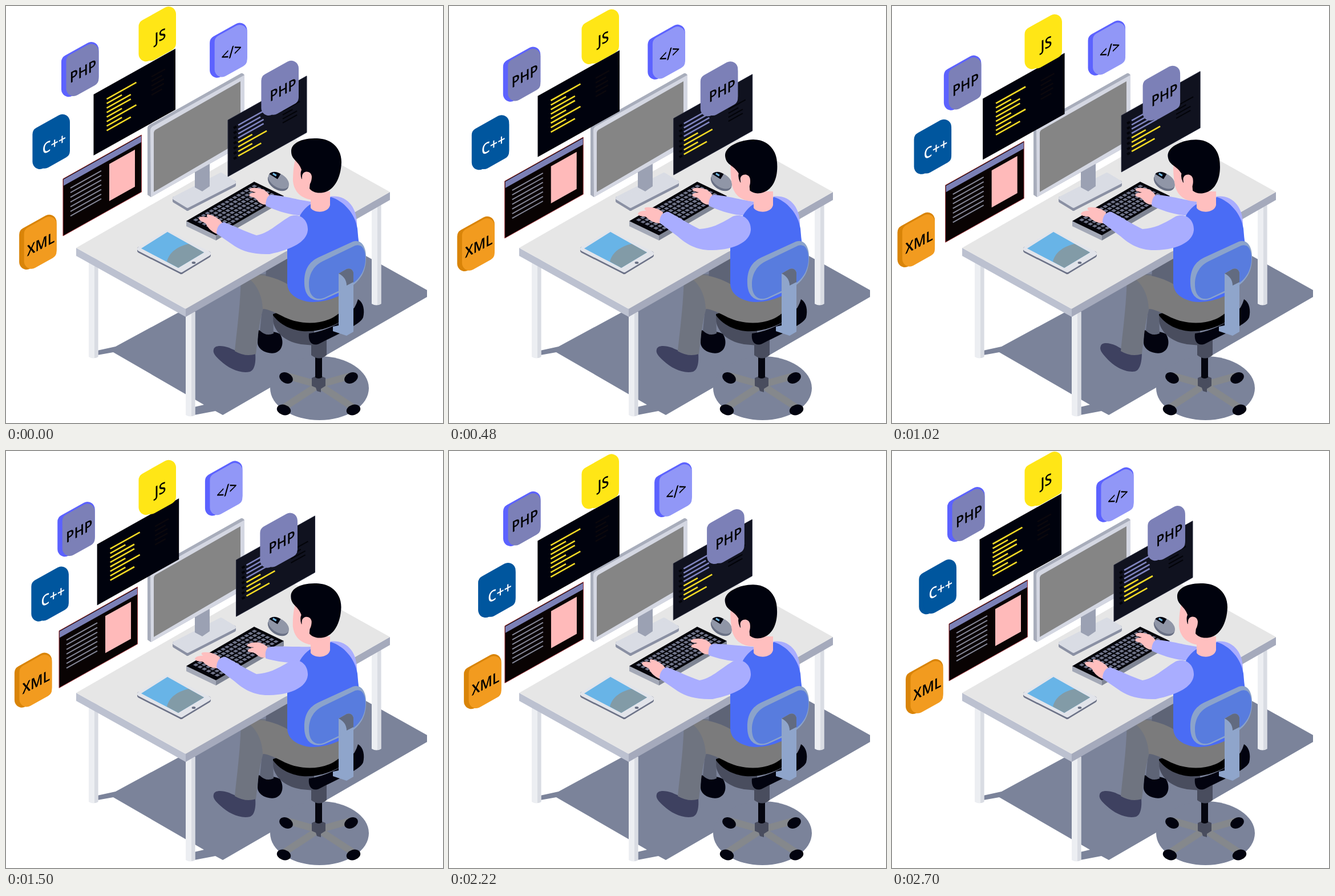
An HTML page that plays this animation: 766 by 731 pixels, repeating every 2.76 s.

```html
<!DOCTYPE html>
<html lang="en">
<head>
<meta charset="utf-8">
<title>Developer at a desk</title>
<style>
html, body { margin: 0; width: 100%; height: 100%; overflow: hidden; background: #fff; }
svg { display: block; width: 766px; height: 731px; }
text { font: 600 26px "Open Sans", "Noto Sans", sans-serif; text-anchor: middle; }
</style>
</head>
<body>
<svg viewBox="0 0 766 731">
  <!-- floor -->
  <g fill="#7b839a">
    <path d="M160 604L192 597L312 532L460 430L620 432L738 498V510L380 717L367 710L330 717V703L347 699L188 607L160 612Z"/>
    <ellipse cx="549.5" cy="670" rx="86.5" ry="56"/>
  </g>

  <!-- chair base and seat -->
  <g id="base"></g>
  <path d="M536 652L548 647L560 652V666L552 671V677L545 675L543 669L536 666Z" fill="#494d5e"/>
  <path d="M542 610H554V651Q548 655 542 651Z" fill="#05060f"/>
  <path d="M535 584H562V612Q549 623 535 612Z" fill="#494d5e"/>
  <path d="M467 541C466 569 487 588 517 593L540 595V540Z" fill="#494d5e"/>
  <path d="M467 541Q480 515 545 508L610 530C590 560 550 572 520 570Q485 566 467 541Z" fill="#000"/>
  <path d="M531 574C556 571 606 554 617 514C627 520 629 534 626 546C620 560 577 577 549 592C538 597 529 590 531 574Z" fill="#02030f"/>

  <!-- legs and shoes -->
  <path d="M442 568C456 573 470 568 480 575C487 585 487 603 472 608C459 611 441 603 441 590Z" fill="#02030f"/>
  <path d="M457 455L500 440V530L468 540L469 574Q456 580 445 569Z" fill="#5e6476"/>
  <path id="foot" d="M364 602C365 595 377 594 391 599C404 605 421 613 437 609C438 622 437 637 428 641C410 645 390 635 376 622C367 614 362 608 364 602Z" fill="#3e4160"/>
  <path d="M412 470L455 470L451 530C443 556 441 587 438 610Q420 616 401 605C405 565 411 525 412 470Z" fill="#6f7480"/>
  <path d="M420 474C445 466 475 477 496 489L603 486C609 512 593 538 567 549C540 560 511 556 489 546C473 538 460 531 450 531C449 508 440 486 420 474Z" fill="#7b7b7c"/>

  <g id="desk"></g>

  <!-- monitor -->
  <g id="stand"></g>
  <path d="M331 284L357 270V316L344 325L331 318Z" fill="#9ba1b3"/>
  <path d="M248 214Q248 210 252 208L412 118Q415 117 418 121V242L254 335L248 331Z" fill="#a8adbb"/>
  <path d="M253 218Q253 214 257 211L418 121V242L254 335Z" fill="#d4d7e2"/>
  <path d="M259 222Q259 219 262 217L411 132V237L259 326Z" fill="#858585"/>

  <g id="keyboard"></g>

  <!-- mouse -->
  <g transform="rotate(32 476 307)">
    <ellipse cx="478" cy="308" rx="20" ry="13" fill="#697084"/>
    <ellipse cx="477" cy="305" rx="20" ry="12" fill="#9096a7"/>
    <path d="M474 293.500V304H457C458 297 466 293 474 293.500Z" fill="#02030f"/>
    <path d="M462 300H469" stroke="#71b5dc" stroke-width="3"/>
  </g>

  <!-- tablet -->
  <g id="tablet"></g>
  <path d="M237 425L283 396L347 432L302 459Z" fill="#68b4e7"/>
  <path d="M320 417L347 432L302 459L282 448C286 431 302 421 320 417Z" fill="#829ba7"/>
  <ellipse cx="329" cy="450" rx="3.400" ry="2" fill="#697084"/>

  <g id="panels"></g>
  <g id="icons"></g>

  <!-- person -->
  <g id="farArm">
    <path d="M462 332C456 322 446 319 438 319C430 318 424 321 428 324L438 327C430 327 424 330 427 333C432 336 437 335 440 340C445 346 450 349 458 348Z" fill="#ffbfbf"/>
    <path d="M455 350C455 341 458 332 464 331C484 332 503 338 540 344L538 362C520 374 480 362 455 350Z" fill="#a9adff"/>
  </g>
  <path d="M568 334C598 330 616 354 615 385L585 375Z" fill="#a9adff"/>
  <path d="M516 366C523 355 531 348 539 345L570 335C592 342 612 364 616 390Q618 420 624 445L600 500Q560 523 527 518C502 512 493 500 493 485V420Z" fill="#4a6cf5"/>
  <path d="M534 325H568V349C565 363 541 364 534 354Z" fill="#ffbfbf"/>
  <path id="hand" d="M381 383C376 374 366 368 358 366C352 364 350 367 354 371C348 369 340 368 338 372C339 377 345 378 350 381C354 390 362 397 371 400Z" fill="#ffbfbf"/>
  <path id="arm" fill="#a9adff"/>
  <g id="head">
    <path d="M509 262C504 278 503 292 503 307C505 326 517 337 537 340L566 322L550 270Z" fill="#ffbfbf"/>
    <path d="M500 253C501 239 521 231 545 232C573 233 588 251 588 274C587 303 574 324 556 327C545 329 537 326 532 320L533 309L518 303Q515 294 518 287C512 270 499 270 500 253Z" fill="#00020d"/>
    <path d="M519 298C520 288 535 288 536 299C536 308 532 317 526 315C520 314 518 306 519 298Z" fill="#ffbfbf"/>
  </g>

  <!-- chair back -->
  <path d="M523 487C522 462 531 449 547 441L608 413C622 408 632 421 631 442C631 466 621 482 602 494L560 513C543 520 524 514 523 487Z" fill="#8ba3cb"/>
  <path d="M531 488C531 468 541 454 556 447L612 420C624 416 631 427 630 446C629 466 618 481 601 491L559 511C543 518 531 509 531 488Z" fill="#587cde"/>
  <path d="M583 469L597 461Q606 458 609 467V571L597 578L573 570V562L583 560Z" fill="#8fa5cb"/>
  <path d="M583 469L597 461Q606 458 609 467V484L597 490Q597 476 583 469Z" fill="#626b80"/>
</svg>
<script>
const LOOP = 2760, STEP = 60, SLOPE = .56;
const $ = id => document.getElementById(id);
const add = (parent, tag, attrs) => {
  const el = document.createElementNS('http://www.w3.org/2000/svg', tag);
  for (const k in attrs) el.setAttribute(k, attrs[k]);
  return parent.appendChild(el);
};
const path = (parent, d, attrs) => add(parent, 'path', { d, ...attrs });

// upright sheet whose top edge rises to the right
const sheet = (x, y, w, h) => `M${x} ${y}l${w} ${-SLOPE * w}v${h}l${-w} ${SLOPE * w}z`;

// lying board given by its left, front and right corners
function board(id, [lx, ly], [fx, fy], [rx, ry], depth, [top, left, right], round = 0) {
  const face = (d, fill) => path($(id), d, {
    fill, stroke: fill, 'stroke-width': round, 'stroke-linejoin': 'round'
  });
  face(`M${lx} ${ly}L${fx} ${fy}v${depth}L${lx} ${ly + depth}z`, left);
  face(`M${fx} ${fy}L${rx} ${ry}v${depth}L${fx} ${fy + depth}z`, right);
  face(`M${lx} ${ly}L${fx} ${fy}L${rx} ${ry}L${lx + rx - fx} ${ly + ry - fy}z`, top);
}

for (const side of [-1, 1]) {
  for (const [dx, dy, tilt] of [[57, -18, 28], [61, 38, 18]]) {
    const x = 548 + side * dx, y = 670 + dy;
    path($('base'), `M548 664L${x} ${y - 4}`, { stroke: '#85888c', 'stroke-width': 12 });
    add($('base'), 'ellipse', {
      cx: x, cy: y, rx: 12.5, ry: 9, fill: '#02030f', transform: `rotate(${-side * tilt} ${x} ${y})`
    });
  }
}

for (const [x, top, end] of [[145, 440, 615], [315, 536, 717], [641, 342, 522]]) {
  path($('desk'), `M${x} ${top}h16.500V${end}q-8 5 -16.500 0Z`, { fill: '#eceef2' });
  path($('desk'), `M${x + 10} ${top}h6.500V${end}q-3 2 -6.500 2Z`, { fill: '#d9dce3' });
}
board('desk', [123, 424], [315, 531], [673, 326], 14, ['#e6e6e6', '#bcc1d0', '#a5aabc']);
board('stand', [295, 337], [318, 351], [400, 309], 5, ['#d9dce4', '#8a90a3', '#8a90a3'], 6);
board('tablet', [234, 426], [307, 463], [355, 434], 3, ['#e2e4ea', '#6d7388', '#6d7388'], 8);
board('keyboard', [316, 377], [368, 402], [487, 333], 9, ['#05050b', '#a4a9b7', '#7f8594']);

const keys = add($('keyboard'), 'g', { transform: 'matrix(1.2 -.69 .52 .25 316 377)', fill: '#70758a' });
for (let row = 0; row < 6; row++) {
  for (let col = 0; col < 16; col++) {
    add(keys, 'rect', { x: 6 + col * 5.7, y: 9 + row * 14.5, width: 4, height: 9.5 });
  }
}

// slanted rows whose lengths swing between min and max
function rows(g, x, y, gap, stroke, count, min, max, width = 2.6, first = 0) {
  for (let i = 0; i < count; i++) {
    const len = min + (max - min) * Math.cos(Math.PI * .4 * (i + first)) ** 2;
    path(g, `M${x} ${y + i * gap}l${len} ${-len * SLOPE}`, { stroke, 'stroke-width': width });
  }
}

function panel(x, y, w, h, fill, stroke = 'none') {
  const g = add($('panels'), 'g', {});
  path(g, sheet(x, y, w, h), { fill, stroke });
  return g;
}
const dark = panel(153.5, 155, 143.5, 107, '#00020d');
rows(dark, 176.5, 163, 7.9, '#f2da25', 8, 24, 52);
rows(dark, 255, 124, 8, '#0b080d', 5, 18, 24);

const page = panel(100, 303, 137.5, 100, '#090303', '#a3353c');
path(page, sheet(101, 304, 136, 11), { fill: '#7b80b6' });
path(page, sheet(181, 277, 45, 65), { fill: '#ffbaba' });
rows(page, 113, 319, 8.2, '#858798', 7, 54, 54, 2);

const code = panel(389, 200, 138, 99, '#10121f', '#24273a');
rows(code, 407, 209, 7.4, '#7f84bf', 4, 38, 48);
rows(code, 407, 239, 8, '#f2da25', 4, 22, 50, 2.6, 4);
rows(code, 399, 214, 9, '#030409', 7, 5, 5, 4);
rows(code, 485, 184, 7, '#030409', 4, 16, 30, 2);

// tile with equally round corners: a stroked parallelogram
function tile(g, x, y, w, color) {
  const r = 13, inner = w - 2 * r;
  path(g, sheet(x + r, y + r + SLOPE * inner, inner, 48), {
    fill: color, stroke: color, 'stroke-width': 2 * r, 'stroke-linejoin': 'round'
  });
}
function icon(label, side, face, ink = '#000') {
  const g = add($('icons'), 'g', {});
  tile(g, 0, 0, 65.5, side);
  tile(g, 8.5, 3.5, 57, face);
  add(g, 'text', { y: 9.5, fill: ink, transform: 'matrix(.9 -.47 0 1 38 51)' }).textContent = label;
  return g;
}

const TAU = 2 * Math.PI;
const place = (el, x, y) => el.setAttribute('transform', `translate(${x} ${y})`);
const turn = (id, deg, x, y) => $(id).setAttribute('transform', `rotate(${deg} ${x} ${y})`);

// motions take u, the share of the loop that has passed
const glide = (el, x, y, dx, dy) => u => {
  const k = (1 - Math.cos(TAU * (u + .016))) / 2;
  place(el, x + dx * k, y + dy * k);
};
const orbit = (el, x, y, r, px, py) => u =>
  place(el, x + r * Math.cos(TAU * (u - px)), y + r * Math.cos(TAU * (u - py)));
const wide = (el, x, y) => orbit(el, x, y, 8.5, .853, .143);
const tight = (el, x, y) => orbit(el, x, y, 6.6, .797, .553);

const violet = '#7c80b7', blue = '#5c62ff', yellow = '#ffe616', navy = '#00569e';
const motions = [
  glide(dark, 0, 0, 6.4, 8.7),
  glide(page, 0, 0, -7.2, 12.8),
  glide(code, 0, 0, 15, -9.2),
  glide(icon('PHP', blue, violet), 97, 63, -7, 27),
  glide(icon('JS', yellow, yellow), 232.5, 1, 0, 15.4),
  wide(icon('</>', blue, '#9197f7'), 352, 24.3),
  wide(icon('XML', '#d98408', '#f29b1f'), 18, 360.5),
  tight(icon('PHP', violet, violet), 445.5, 102),
  tight(icon('C++', navy, navy, '#fff'), 44.5, 196)
];

const smooth = k => (k = Math.min(1, Math.max(0, k)), k * k * (3 - 2 * k));
// rises after one time and is back at rest by the other
const pulse = (t, from, to, ramp) => smooth((t - from) / ramp) * smooth((to - t) / ramp);

// forearm swinging up by k at the wrist, less so at the elbow
const armPath = k => `M369 ${399 - 19 * k}
  C369 ${389 - 20 * k} 374 ${380 - 20 * k} ${382 + 3 * k} ${379 - 18 * k}
  C402 ${386 - 16 * k} 420 ${396 - 14 * k} 439 ${402 - 11 * k}
  C459 ${399 - 9 * k} 474 383 497 369C514 362 530 374 529 393
  C527 414 500 427 462 ${435 - 7 * k}C435 ${436 - 7 * k} 415 ${430 - 13 * k} 401 ${421 - 17 * k}Z`;

function draw(t) {
  for (const move of motions) move(t / LOOP);
  const nod = pulse(t, 0, 1560, 540) + pulse(t, 1800, 2700, 450);
  const tap = pulse(t, 1080, 1860, 390) + .6 * pulse(t, 1920, 2460, 270);
  const reach = pulse(t, 0, 2220, 450);
  turn('head', -10.5 * nod, 550, 348);
  turn('farArm', -10 * tap, 535, 355);
  turn('foot', 5 * pulse(t, 600, 1500, 450), 432, 620);
  $('hand').setAttribute('transform', `translate(${-3 * reach} ${-20 * reach}) rotate(${-18 * reach} 376 391)`);
  $('arm').setAttribute('d', armPath(reach));
}

const start = performance.now();
function tick() {
  const t = (performance.now() - start) % LOOP;
  draw(Math.floor(t / STEP) * STEP);
  requestAnimationFrame(tick);
}
tick();
</script>
</body>
</html>
```
